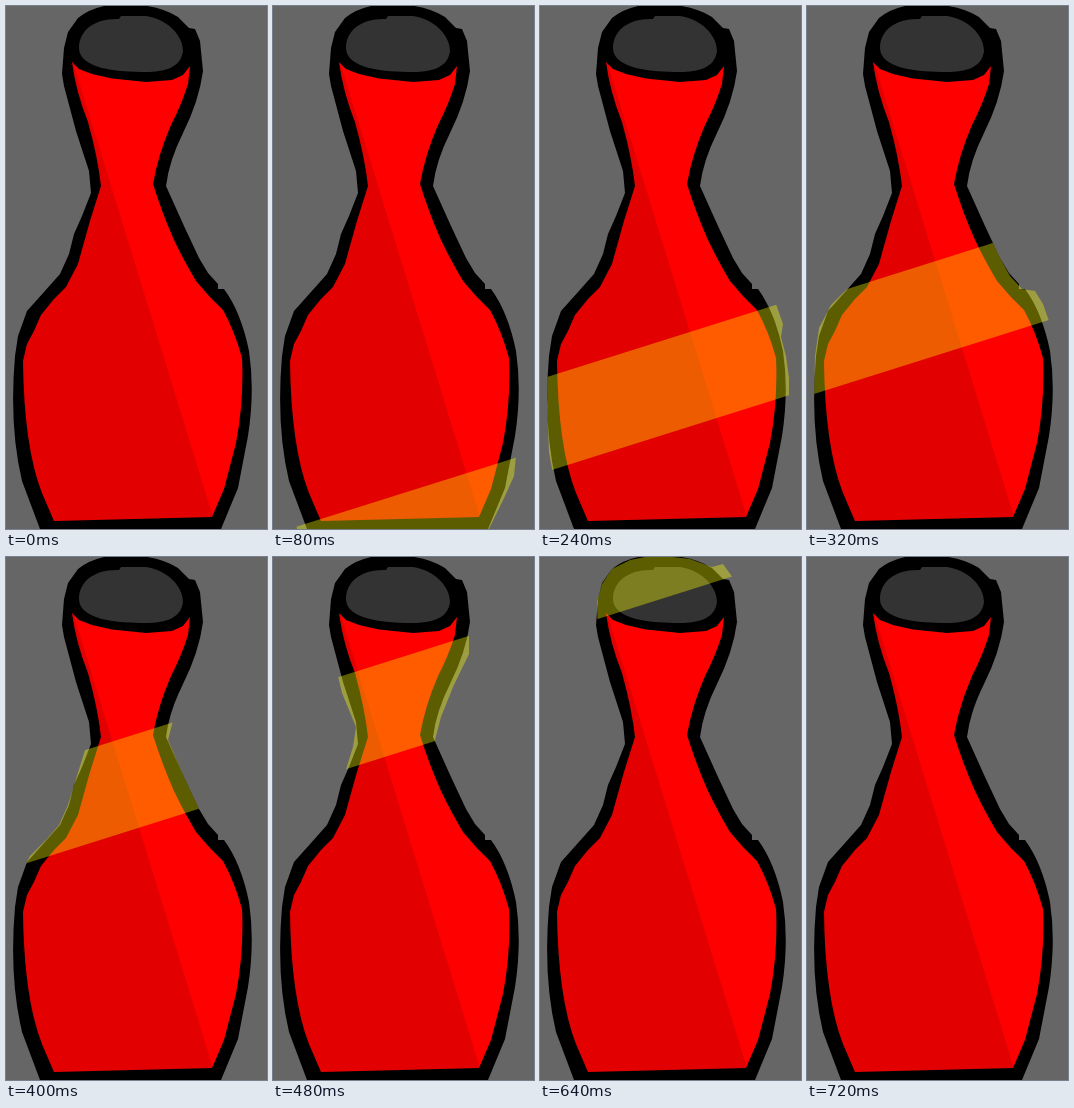
Write an HTML page that moves like this. It is 261x523 px and loops after 6.8 s.

```html
<!DOCTYPE html>
<html lang="en">
<head>
<meta charset="utf-8">
<title>Shining bottle</title>
<style>
  html, body { margin: 0; width: 100%; height: 100%; overflow: hidden; background: #666; }
  svg { display: block; width: 100%; height: 100%; }
</style>
</head>
<body>
<svg viewBox="0 0 261 523" preserveAspectRatio="none">
  <defs>
    <path id="body" d="M66 56 73 63 86 68 106 72.500 140 76 166 74 177 69 184 60 182 78
      Q175 100 165 119 152 149 147 178 Q156 207 168 234 177 253 190 275 L203 290 217 304
      Q229 326 236 352 238 395 230 437 L218 483 206 511 48 515 36 487
      Q18 441 17 355 L21 338 28 325 35 309 48 293 60 281 72 258 84 215 95 180
      Q92 152 82 116 70 86 66 56Z"/>
    <clipPath id="bodyClip"><use href="#body"/></clipPath>
    <clipPath id="glassClip">
      <path d="M62 27 72 12 90 3 115-2 150 2 172 10 183 7 193 21 200 40 196 65 196 97
        180 130 168 160 162 183 178 220 193 252 203 270 215 283 228 285 236 298 243 318
        241 331 246 350 249 372 249 390 241 470 232 490 216 523 24 523 15 480 9 446
        7 400 8 350 12 322 24 299 40 283 53 268 62 248 70 222 80 190 83 170 69 136
        58 90 57 45Z"/>
    </clipPath>
  </defs>
  <rect width="261" height="523" fill="#666"/>
  <path d="M62 26 72 12Q88-1 115-2 152-2 172 11L183 22 189 23 194 35 197 65
    Q193 95 177 127 163 155 160 180 L178 220 193 252 202 267 212 278 212 283 218 283
    Q235 306 243 345 249 385 242 430 L232 482 215 523 34 523 16 475
    Q3 420 9 350 L12 330 21 305 38 286 54 268 63 248 68 228 76 210 85 187 83 165
    70 125 58 80 56 68 58 42Z"/>
  <use href="#body" fill="#f00"/>
  <path d="M67 56 207 511V523H0V56Z" fill="#000" fill-opacity=".11" clip-path="url(#bodyClip)"/>
  <path d="M73 42C73 24 89 12 113 13L115 10 140 10C161 13 177 29 177 45
    C175 62 158 66 140 66 112 66 73 63 73 42Z" fill="#333"/>
  <g clip-path="url(#glassClip)">
    <path id="shine" fill="#ff0" fill-opacity=".36"/>
  </g>
</svg>
<script>
  const LOOP = 6800, STEP = 80, LAST_STEP = 8;
  const RISE = 77.5, HEIGHT = 94.5, SLOPE = -0.315;
  const shine = document.getElementById('shine');

  function draw(time) {
    const step = Math.floor((time % LOOP) / STEP);
    const visible = step >= 1 && step <= LAST_STEP;
    shine.setAttribute('visibility', visible ? 'visible' : 'hidden');
    if (!visible) return;
    const bottom = 622.6 - RISE * (step - 1);
    const right = bottom + 261 * SLOPE;
    shine.setAttribute('d',
      `M0 ${bottom}L261 ${right}V${right - HEIGHT}L0 ${bottom - HEIGHT}Z`);
  }

  const start = performance.now();
  function tick() {
    draw(performance.now() - start);
    requestAnimationFrame(tick);
  }
  tick();
</script>
</body>
</html>
```
